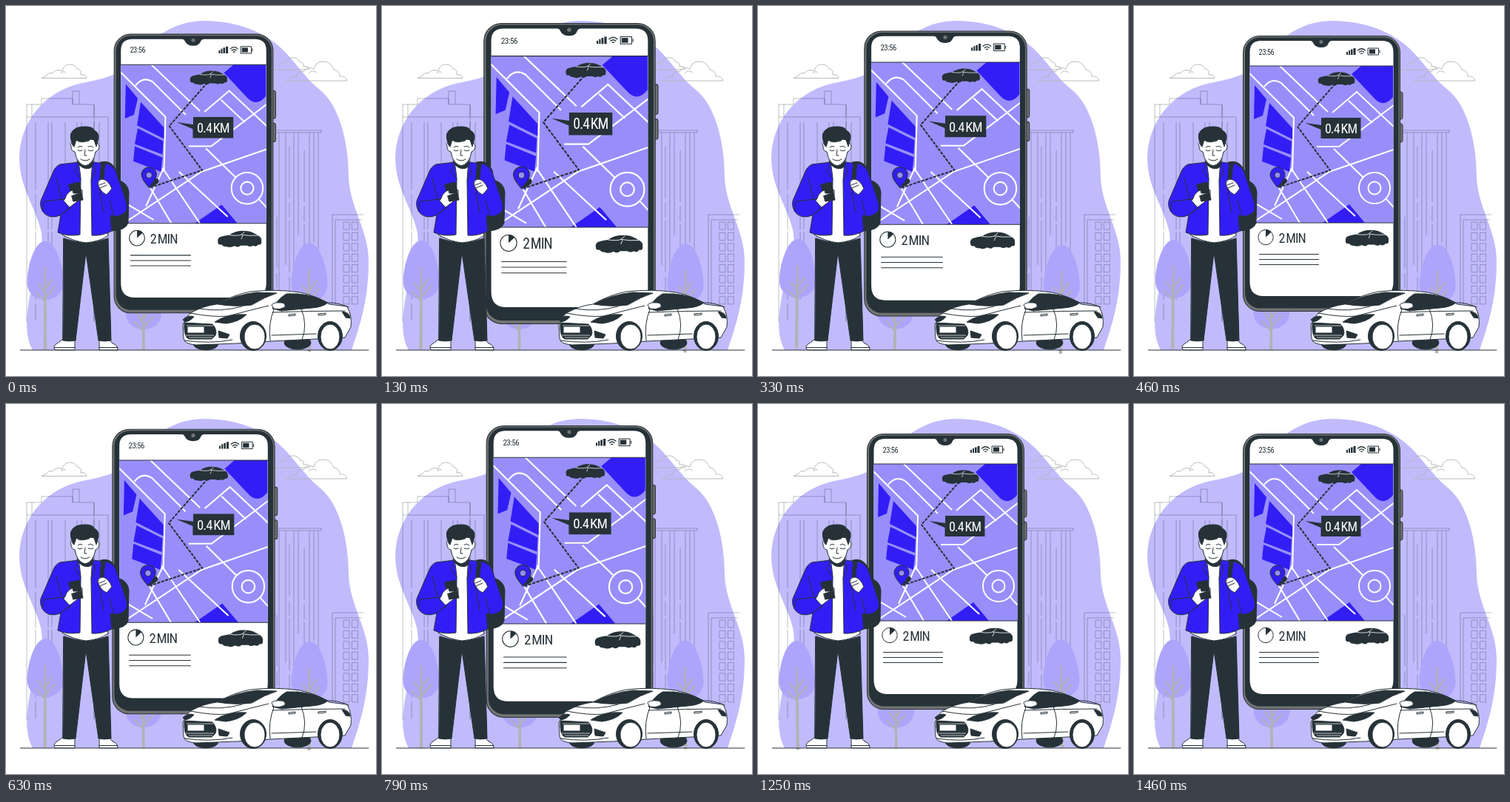
Write an HTML page that moves like this. It is 500 px wide and 500 px high and loops after 1.5 s.

```html
<!DOCTYPE html>
<html lang="en">
<head>
<meta charset="utf-8">
<title>Ride arriving</title>
<style>
  html, body { margin: 0; height: 100%; overflow: hidden; background: #fff; }
  svg { display: block; width: 100vw; height: 100vh; }
  text {
    font-family: "Roboto Condensed", "Liberation Sans Narrow", Roboto, "Liberation Sans", sans-serif;
    font-stretch: 75%; letter-spacing: -.05em; word-spacing: -.08em;
  }
  .ink { fill: #263238; }
  .blue { fill: #321ef5; }
  .line { fill: none; stroke: #263238; stroke-linecap: round; stroke-linejoin: round; }
  .white { fill: #fff; stroke: #263238; stroke-linejoin: round; }
  .faint { fill: none; stroke: #263238; stroke-opacity: .34; stroke-width: .9; }
</style>
</head>
<body>
<svg viewBox="0 0 500 500">
  <defs>
    <g id="crown">
      <path fill="#ada5fb" d="M0 0C16 0 24.500 38 24.500 55C24.500 71 13 79 0 79S-24.500 71-24.500 55C-24.500 38-16 0 0 0Z"/>
      <path fill="none" stroke="#b2b2b2" stroke-width="2" d="M0 35V100M0 65L10 51M0 76L14 61M0 70L-10 57M0 82L-13 68"/>
      <path fill="#b2b2b2" d="M-1.200 50H1.200L2 107H-2Z"/>
    </g>
    <g id="tree">
      <use href="#crown"/>
      <path fill="#b2b2b2" d="M-1.500 100H1.500L2.200 147H-2.200Z"/>
    </g>
    <g id="taxi">
      <path class="ink" d="M0 15Q-1 10 3 8Q9 6 15 5.500Q21 1 29 0Q41-1 48 3Q57 7 58 11L58 16Q57 19 54 18Q51 22 47 19.500Q43 22 39 19.500H30Q27 23 22 20Q16 23 12 21Q6 21 5 18Q0 19 0 15Z"/>
      <path fill="none" stroke="#fff" stroke-width=".8" d="M15 5.500Q27 7 31 5L36 1M31 5Q42 7 54 6M33 6L31 11"/>
    </g>
    <clipPath id="mapArea"><path d="M156.500 81H350.500V293H156.500Z"/></clipPath>
  </defs>

  <path fill="#c1bbfc" d="M268 20C310 20 348 34 373 58C395 80 404 97 425 114C449 134 463 180 463 232C465 273 490 303 490 345C490 395 479 430 467 465H36C25 445 27 418 33 388C41 359 53 333 47 302C38 268 18 244 18 205C19 156 52 115 103 104C140 97 157 91 174 72C199 39 231 20 268 20Z"/>

  <!-- skyline -->
  <g class="faint">
    <path d="M28 427V133H48V125H90V133H119V427M35 133V150H138V427M90 133V115H99V133M119 133V150M28 150H35"/>
    <path d="M40 157V425M57 157V400M62 157V330M80 157V425M96 157V300M102 157V260M119 157V425M126 157V425" stroke-dasharray="92 5 48 3"/>
    <path d="M361 168H426V171H361M369 171V400M389 171V385M395 171V310M410 171V385M416 171V320M422 171V410M378 171V350"/>
    <path d="M366 285V400M383 190V385M403 195V385" stroke-dasharray="70 6 20 4"/>
    <path d="M441 403V282H483M445 403V289H481"/>
    <path id="windows"/>
  </g>
  <g fill="none" stroke="#b4b4b4" stroke-width=".9" stroke-linejoin="round">
    <path d="M48 97.500H109Q108 91 101 93Q103 86 96 85Q94 79 86 79Q78 79 76 88Q67 84 63 91Q57 89 54 95ZM74 91Q78 87 81 90"/>
    <path d="M361 86H410Q408 80 402 82Q403 76 397 76Q394 69 387 70Q380 70 378 77Q371 75 369 82"/>
    <path d="M377 101H461Q459 94 451 95Q451 87 443 86Q439 75 429 75Q418 75 416 85Q406 80 402 89Q395 86 392 96Q386 93 384 99M409 91Q414 85 420 90"/>
  </g>

  <g id="trees">
    <use href="#tree" x="53" y="318"/>
    <use href="#crown" x="186" y="358"/>
    <use href="#tree" x="410" y="320"/>
  </g>
  <path class="line" stroke-width="1" d="M19.500 465H490"/>

  <g id="phone">
    <path fill="#727272" stroke="#263238" d="M358 116H361Q363 116 363 119V150Q363 153 361 153H358ZM358 159H361Q363 159 363 162V181Q363 184 361 184H358Z"/>
    <rect x="147.500" y="40.500" width="212" height="372" rx="22" fill="#727272" stroke="#263238"/>
    <rect class="ink" x="150" y="42.500" width="207.500" height="366" rx="20"/>
    <path fill="#fff" d="M172 47H238Q241 47 242 50Q245 56 253 56Q261 56 263 50Q264 47 268 47H335Q350.500 47 350.500 62V373Q350.500 392 332 392H175Q156.500 392 156.500 373V62Q156.500 47 172 47Z"/>
    <circle cx="253" cy="48.500" r="2.500" fill="#727272"/>
    <text class="ink" x="168.500" y="65.500" font-size="10.500">23:56</text>
    <path class="ink" d="M287 62H289V66H287ZM290 60H292V66H290ZM293 58.500H295.500V66H293ZM296.500 57H299.500V66H296.500Z"/>
    <path class="line" stroke-width="1.300" d="M302.500 60Q307.500 55.500 312.500 60M304.500 62.200Q307.500 59.500 310.500 62.200M306.500 64.200Q307.500 63.500 308.500 64.200"/>
    <path class="line" d="M316.500 57H330.500V66H316.500ZM332 60V63"/>
    <path class="ink" d="M318 58.500H326V64.500H318Z"/>

    <g clip-path="url(#mapArea)">
      <path fill="#988efa" d="M156 81H351V293H156Z"/>
      <path class="blue" d="M163 107L179 126L174 148L162 153ZM183 131L214 165V180L178 162ZM179 166L213 183L212 201L175 187ZM175 190L212 205L210 224L173 210ZM307 81L294 92L324 124Q337 139 350 123V81ZM255 293L291 268L312 293Z"/>
      <g fill="none" stroke="#fff" stroke-width="2">
        <path d="M156 91L216 151L214 224M176 109Q186 96 199 104L243 148M197 81L262 143M268 144L301 116L351 163M290 128L322 158M247 190H277L351 134M270 193L310 232M156 262L200 288M160 293L264 224L351 194M214 218L190 270M196 246L224 293M212 219L262 293M234 224L299 284M341 261L351 272"/>
        <circle cx="325" cy="246" r="21" fill="#988efa"/>
        <circle cx="325" cy="246" r="8.500"/>
      </g>
      <path class="line" style="stroke-linecap:butt" stroke-width="2" stroke-dasharray="4 1.500" d="M272 105L221 163L265 222L196 245"/>
    </g>
    <path class="line" d="M156.500 81H350.500M156.500 293H350.500"/>
    <use href="#taxi" transform="translate(249 89.500) scale(.85)"/>
    <path class="ink" d="M231 158L253 161V151H306.500V179H252.500V167Z"/>
    <text fill="#fff" x="279.500" y="171.500" font-size="18" text-anchor="middle">0.4 KM</text>
    <path class="ink" d="M194 245L200 234Q207 231 207 237Q205 242 194 245Z"/>
    <path class="blue" stroke="#263238" d="M194 245Q184 234 184 228A10 10 0 0 1 204 228Q204 234 194 245Z"/>
    <circle cx="194" cy="228.500" r="4" fill="#988efa" stroke="#263238"/>

    <circle class="white" cx="178" cy="312.500" r="10.200"/>
    <path class="ink" d="M178 312.500V302.300A10.200 10.200 0 0 1 185.500 305.500Z"/>
    <text class="ink" x="195.500" y="319.500" font-size="18">2 MIN</text>
    <use href="#taxi" x="286" y="303"/>
    <path class="line" d="M169.500 335.500H249.500M169.500 342.500H249.500M169.500 349.500H249.500"/>
  </g>

  <!-- passenger -->
  <g stroke="#263238" stroke-linejoin="round" stroke-linecap="round">
    <path class="ink" d="M128 211Q142 207 149 222L151 235Q165 239 166 252L165 293Q162 303 143 304L130 290Z"/>
    <path class="white" d="M66 464.500Q63 459 69 456L79 449H93V464.500ZM151 464.500Q151 458 144 456L138 449H126V464.500Z"/>
    <path class="line" d="M66 461.500H93M126 461.500H151"/>
    <path class="ink" d="M78 314Q108 325 138 314L142 452Q133 454 125 452L108 333L94 452Q85 454 77 452Z"/>
    <path class="white" d="M97 205V217L91 225L76 309Q91 318 108 320Q128 318 138 310L120 221L117 205Z"/>
    <path class="ink" d="M97 209L117 207V217Q108 224 98 214Z"/>
    <path class="blue" d="M98 211L73 214Q66 217 63 226L47 263Q45 273 52 280Q62 288 74 282L70 306Q84 312 100 309L101 233Z"/>
    <path class="blue" d="M117 211L136 213Q146 216 149 225L163 266Q166 277 158 281Q151 286 141 283L143 304Q130 311 116 310L115 236Z"/>
    <path class="line" d="M68 233L76 264M74 282L87 273M140 262L145 283M98 211L93 224L101 234M117 211L121 224L115 236M126 247L132 279"/>
    <path class="blue" d="M52 264L78 261L87 272L73 283Q57 289 49 277Z"/>
    <path class="white" d="M78 263Q84 253 90 247L103 249L103 256L99 262L86 272Z"/>
    <path class="ink" d="M85 241L99 238L104 262L91 264Z"/>
    <path class="white" d="M80 259Q84 250 90 249L91 253L98 253M92 258H100M91 263L99 261"/>
    <path class="ink" d="M129 212L134 213L131 239L127 238Z"/>
    <path class="white" d="M124 240Q125 234 131 234Q139 236 143 247L136 255Q127 251 124 240Z"/>
    <path class="line" d="M126 242L134 239M127 246L136 242"/>

    <path class="white" d="M91 184Q86 184 88 190Q88 196 93 197Q96 214 107 216Q118 214 121 197Q126 195 126 189Q125 184 122 185L119 178H94Z"/>
    <path class="ink" d="M90 188Q86 177 88 172Q92 163 106 163Q118 163 119 168Q126 171 125 179L122 190L119 181Q114 179 112 182Q100 186 95 181L92 190Z"/>
    <path class="line" d="M97 191Q100 188 103 190M111 190Q115 188 118 191M97 195Q100 197 103 195M111 195Q115 197 118 195M107 194L106 202H109M101 207Q107 211 113 207"/>
  </g>

  <!-- car -->
  <g stroke="#263238" stroke-linejoin="round">
    <ellipse class="ink" cx="270" cy="456" rx="17" ry="9"/>
    <ellipse class="ink" cx="394" cy="455" rx="18" ry="9"/>
    <path class="white" d="M240 449L239 431Q243 420 249 415Q267 405 285 403Q308 390 330 386Q365 382 397 387Q421 392 437 403L461 406Q468 419 466 434L458 448L358 453L312 456L257 458Q241 457 240 449Z"/>
    <path class="ink" d="M286 403Q310 390 339 387L366 388Q350 393 332 404Q310 407 286 403Z"/>
    <path class="ink" d="M360 409Q368 395 379 389Q410 387 435 401Q428 407 413 408L372 412Z"/>
    <path class="line" stroke="#fff" stroke-width="1.500" d="M394 389L401 408"/>
    <path class="line" d="M357 452Q354 430 362 410M399 409Q408 431 400 451M435 401Q447 400 463 407M249 415Q280 421 300 419Q326 412 355 405M262 409Q290 414 319 406M360 414Q410 412 458 412M359 445L419 443"/>
    <path class="ink" d="M282 427Q300 415 325 417Q315 427 297 429ZM239 424Q246 417 254 420Q249 426 242 427ZM454 413Q465 414 465 422L459 421Z"/>
    <path class="line" stroke="#fff" stroke-width=".9" d="M291 425Q304 420 317 419"/>
    <path class="ink" d="M241 428L279 430Q286 438 283 445L278 450L247 450Q240 447 241 428ZM287 439L302 444L299 449L288 448Z"/>
    <path stroke="#fff" stroke-width=".7" d="M244 432H280M243 445H281M247 448H279"/>
    <path class="white" d="M245 433H268V442H245Z"/>
    <path class="line" d="M241 452Q275 457 306 451"/>
    <path class="white" d="M359 404Q361 400 372 401Q378 401 377 407Q370 411 362 409ZM382 417L391 416V418L382 419ZM422 416L432 415V417L422 418Z"/>
    <g class="white">
      <ellipse class="ink" cx="334" cy="446" rx="17.500" ry="19.500"/>
      <ellipse class="ink" cx="438" cy="446" rx="16.500" ry="19.500"/>
      <ellipse cx="336" cy="447" rx="14" ry="17"/>
      <ellipse cx="438" cy="447" rx="13" ry="17"/>
    </g>
  </g>
</svg>
<script>
  const LOOP = 1500, PHASE = 20;
  const PULSE = [[0, 1], [.11, 1.1], [.3, 1], [.4, 1], [.5, 1.1], [.6, 1], [1, 1]];
  const WIND = [[0, 0], [.25, 1], [.75, -1], [1, 0]];
  const phone = document.getElementById("phone");
  const trees = document.getElementById("trees");

  let windows = "";
  for (let y = 292; y < 400; y += 14.4)
    for (const x of [456, 467.5]) windows += `M${x} ${y}h8v10h-8z`;
  document.getElementById("windows").setAttribute("d", windows);

  function valueAt(keys, p) {
    const i = keys.findIndex(([at]) => at > p);
    const [t0, v0] = keys[i - 1], [t1, v1] = keys[i];
    return v0 + (v1 - v0) * (p - t0) / (t1 - t0);
  }

  function draw() {
    const p = (performance.now() + PHASE) % LOOP / LOOP;
    const scale = valueAt(PULSE, p);
    phone.setAttribute("transform", `translate(254 227) scale(${scale}) translate(-254 -227)`);
    trees.setAttribute("transform", `rotate(${valueAt(WIND, p)} 232 392)`);
    requestAnimationFrame(draw);
  }
  draw();
</script>
</body>
</html>
```
